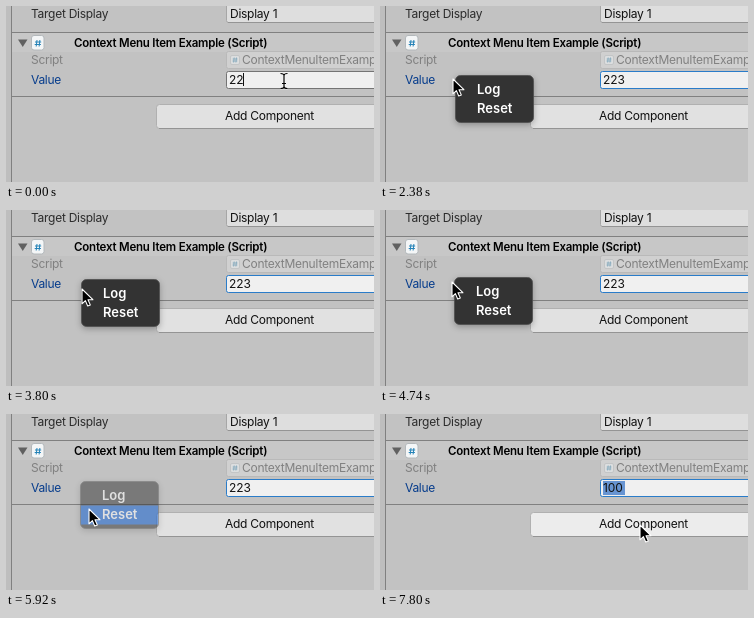
An HTML page that plays this animation: 368 by 176 pixels, repeating every 8 s.

```html
<!DOCTYPE html>
<html lang="en">
<head>
<meta charset="utf-8">
<title>Context menu on an inspector field</title>
<style>
  html, body { margin: 0; width: 100%; height: 100%; overflow: hidden; background: #c2c2c2; }
  svg { display: block; width: 368px; height: 176px; }
  text { font: 12px Inter, "Liberation Sans", sans-serif; letter-spacing: -.27px; fill: #111; white-space: pre; }
  .label { fill: #2b2b2b; }
  .dim { fill: #808080; }
  .title { font-size: 11.5px; font-weight: 600; letter-spacing: -.21px; fill: #000; }
  .blue { fill: #063c8c; }
  .number { letter-spacing: -.1px; }
  .menu text { font-size: 13px; font-weight: 600; letter-spacing: 0; fill: #fff; }
  .panel { filter: drop-shadow(0 2px 3px rgba(0, 0, 0, .28)); }
</style>
</head>
<body>
<svg viewBox="0 0 368 176">
  <rect width="368" height="176" fill="#c2c2c2"/>
  <rect width="5" height="176" fill="#bebebe"/>
  <rect x="5" width="1" height="176" fill="#808080"/>

  <text class="label" x="25" y="12">Target Display</text>
  <rect x="220.5" y="-4.5" width="160" height="21" rx="2" fill="#dedede" stroke="#a6a6a6"/>
  <path d="M222 16.5h146" stroke="#949494"/>
  <text x="224" y="12">Display 1</text>

  <rect x="6" y="26" width="362" height="1" fill="#808080"/>
  <rect x="6" y="27" width="362" height="19" fill="#c7c7c7"/>
  <path d="M12 33.5h9.5l-4.75 7.5z" fill="#616161"/>
  <rect x="25.500" y="29.500" width="12.500" height="14.500" rx="2.500" fill="#f4f6f7" stroke="#b3b8bb"/>
  <path d="M31 34l-.8 6.500M33.900 34l-.8 6.500M29 36h6.200M28.700 38.500h6.200" stroke="#2583b8"/>
  <text class="title" x="68" y="41">Context Menu Item Example (Script)</text>

  <text class="dim" x="25" y="58">Script</text>
  <rect x="220.5" y="45.5" width="160" height="17" rx="2" fill="#d0d0d0" stroke="#b9b9b9"/>
  <rect x="224.5" y="49.5" width="9" height="9" rx="1.5" fill="#dcdedf" stroke="#c3c5c6"/>
  <path d="M228.2 51.500l-.6 5M230.500 51.500l-.6 5M226.700 53h4.800M226.500 55h4.800" stroke="#7fa5b9" stroke-width=".8"/>
  <text class="dim" x="236" y="58">ContextMenuItemExample</text>

  <text class="blue" x="25" y="78">Value</text>
  <rect id="field" x="220.5" y="65.5" width="160" height="17" rx="2" fill="#f0f0f0"/>
  <rect id="selection" x="223" y="67" width="22" height="14" fill="#6794d2"/>
  <text id="value" class="number" x="223" y="78"></text>
  <rect id="caret" y="67" width="1" height="13" fill="#111"/>

  <rect x="6" y="90" width="362" height="1" fill="#808080"/>
  <rect id="button" x="150.5" y="98.5" width="226" height="24" rx="3" stroke="#b0b0b0"/>
  <path d="M153 122.5h215" stroke="#949494"/>
  <text x="263.5" y="114" text-anchor="middle">Add Component</text>

  <g id="menu" class="menu">
    <rect class="panel" width="78" height="47" rx="5" fill="#333" stroke="#505050" stroke-width=".8"/>
    <rect id="row" x=".4" width="77.2" height="19" fill="#0759d3"/>
    <text x="21.5" y="18.5">Log</text>
    <text x="21.5" y="37.5">Reset</text>
  </g>

  <g id="cursor">
    <path id="slide" d="M-5.500 3.500l4-3v6zM9.500 3.500l-4-3v6z" stroke="#fff" stroke-width=".5"/>
    <path id="arrow" d="M0-1v14.800l3.400-3.200 2.300 5.400 2.600-1.100-2.300-5.200h4.900z"
      stroke="#fff" stroke-width="1.1" stroke-linejoin="round"/>
    <g id="beam" fill="none">
      <path d="M-3.5-7.5Q0-7.5 0-5.5Q0-7.5 3.5-7.5M0-5.5V5.5M-3.5 7.5Q0 7.5 0 5.5Q0 7.5 3.5 7.5M-2 2.5h4"
        stroke="#fff" stroke-opacity=".6" stroke-width="2.4"/>
      <path d="M-3.5-7.5Q0-7.5 0-5.5Q0-7.5 3.5-7.5M0-5.5V5.5M-3.5 7.5Q0 7.5 0 5.5Q0 7.5 3.5 7.5M-2 2.5h4"
        stroke="#000" stroke-width="1.2"/>
    </g>
  </g>
</svg>
<script>
  const LOOP = 8000;
  const $ = id => document.getElementById(id);

  // Every track holds its value until the next entry: [ms, ...value].
  const cursor = [
    [0, "beam", 278, 75], [720, "beam", 268, 75],
    [840, "slide", 200, 72], [950, "slide", 118, 71], [1070, "slide", 80, 72], [1190, "slide", 73, 73],
    [2380, "arrow", 73, 74], [2740, "arrow", 74, 77], [2860, "arrow", 75, 79], [2970, "arrow", 76, 80],
    [3810, "arrow", 75, 78], [3920, "arrow", 74, 75], [4040, "slide", 74, 73],
    [4270, "slide", 73, 73], [4390, "slide", 72, 72], [4740, "arrow", 72, 73],
    [4980, "arrow", 74, 81], [5100, "arrow", 79, 90], [5220, "arrow", 82, 95], [5460, "arrow", 83, 96],
    [5930, "arrow", 92, 96], [6040, "arrow", 108, 95], [6160, "arrow", 131, 94],
    [6280, "arrow", 165, 92], [6400, "arrow", 205, 88], [6510, "arrow", 231, 85],
    [6630, "beam", 250, 79], [6740, "beam", 265, 75], [6860, "beam", 272, 72], [6970, "beam", 274, 71],
    [7090, "beam", 275, 72], [7450, "beam", 274, 78],
    [7570, "arrow", 268, 93], [7680, "arrow", 262, 107], [7800, "arrow", 260, 112]
  ];
  const value = [[0, "22"], [240, "223"], [5930, "100"]];
  const caretX = [[0, 237], [240, 244], [1430, null]];
  const menuAlpha = [[0, 0], [2270, 1], [3920, .5], [4040, 0], [4740, 1], [5810, .5], [5930, 0]];
  const row = [
    [0, -1], [2860, 0], [3690, -1], [3810, 0], [4040, -1],
    [4980, 0], [5220, 1], [5570, -1], [5690, 1], [5930, -1]
  ];

  const at = (track, t) => track.findLast(entry => entry[0] <= t).slice(1);
  const show = (id, on) => $(id).setAttribute("visibility", on ? "visible" : "hidden");
  const set = (id, name, v) => $(id).setAttribute(name, v);

  function draw(t) {
    const [shape, x, y] = at(cursor, t);
    set("cursor", "transform", `translate(${x} ${y})`);
    show("beam", shape === "beam");
    show("arrow", shape !== "beam");
    show("slide", shape === "slide");

    set("field", "stroke", shape === "beam" ? "#747474" : "#2a7cc9");
    set("button", "fill", shape === "arrow" && x > 150 && y > 98 ? "#ececec" : "#e1e1e1");
    $("value").textContent = at(value, t)[0];
    show("selection", t >= 7090);

    const [cx] = at(caretX, t);
    show("caret", cx !== null);
    if (cx !== null) set("caret", "x", cx);

    const [alpha] = at(menuAlpha, t);
    const [item] = at(row, t);
    set("menu", "opacity", alpha);
    set("menu", "transform", t < 4700 ? "translate(75.5 69.5)" : "translate(74.5 67.5)");
    show("row", item >= 0);
    set("row", "y", 5 + 19 * Math.max(item, 0));
  }

  const start = performance.now();
  function tick() {
    draw((performance.now() - start) % LOOP);
    requestAnimationFrame(tick);
  }
  tick();
</script>
</body>
</html>
```
